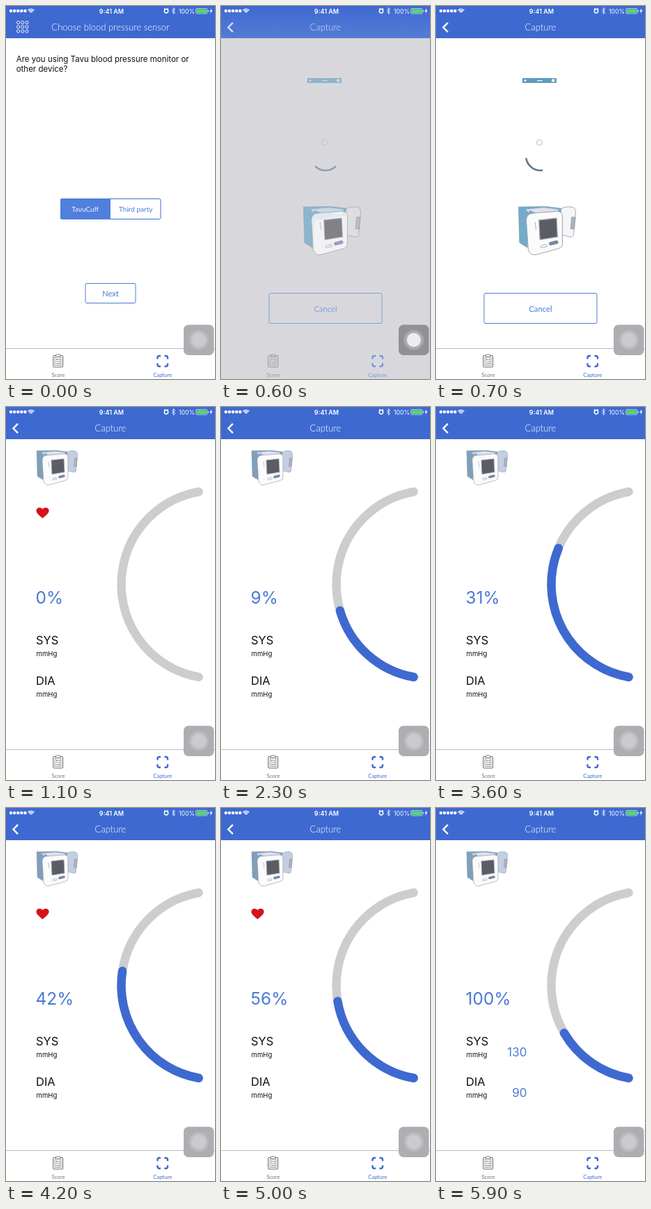
Recreate the animation shown at these times as an HTML page with a canvas. Size 300x533 px, loop 6 s.

```html
<!DOCTYPE html>
<html lang="en">
<head>
<meta charset="utf-8">
<title>Blood pressure capture</title>
<style>
html, body { margin: 0; width: 100%; height: 100%; overflow: hidden; background: #fff; }
canvas { display: block; width: 300px; height: 533px; }
</style>
</head>
<body>
<canvas id="stage"></canvas>
<script>
const LOOP = 6000;
const BLUE = '#3e69d1', TEXT_BLUE = '#4b7ad6', GREY = '#cccdcf';
const SANS = 'Inter, sans-serif', ROUND = 'Lato, sans-serif';
const canvas = document.getElementById('stage');
const ctx = canvas.getContext('2d');
const ratio = window.devicePixelRatio || 1;
canvas.width = 300 * ratio;
canvas.height = 533 * ratio;

function paint(fill, stroke, width = 1) {
  if (fill) { ctx.fillStyle = fill; ctx.fill(); }
  if (stroke) { ctx.strokeStyle = stroke; ctx.lineWidth = width; ctx.stroke(); }
}
function box(x, y, w, h, r, fill, stroke, width) {
  ctx.beginPath();
  ctx.roundRect(x, y, w, h, r);
  paint(fill, stroke, width);
}
function disc(x, y, r, fill, stroke, width) {
  arc(x, y, r, 0, 360, fill, stroke, width);
}
function arc(x, y, r, from, to, fill, stroke, width) {
  ctx.beginPath();
  ctx.arc(x, y, r, from * Math.PI / 180, to * Math.PI / 180);
  paint(fill, stroke, width);
}
function shape(path, fill, stroke, width) {
  const p = new Path2D(path);
  if (fill) { ctx.fillStyle = fill; ctx.fill(p); }
  if (stroke) { ctx.strokeStyle = stroke; ctx.lineWidth = width || 1; ctx.stroke(p); }
}
function text(str, x, y, font, color, align = 'left') {
  ctx.font = font;
  ctx.fillStyle = color;
  ctx.textAlign = align;
  ctx.fillText(str, x, y);
}
function faded(alpha, drawPart) {
  ctx.save();
  ctx.globalAlpha = alpha;
  drawPart();
  ctx.restore();
}

function statusBar() {
  for (let i = 0; i < 5; i++) disc(7 + i * 5.1, 7, 2.2, '#fff');
  for (const r of [2, 4, 6]) arc(36, 10.3, r, 222, 318, null, '#fff', 1.3);
  text('9:41 AM', 151.5, 10.5, '600 9px ' + SANS, '#fff', 'center');
  disc(230, 7.3, 2.7, null, '#fff', 1.5);
  shape('M227 4.5l1.6-1.3M233 4.5l-1.6-1.3', null, '#fff', 1.2);
  shape('M238.2 4.7l4.6 4.4-2.4 2.4v-9l2.4 2.3-4.6 4.4', null, '#fff', 0.8);
  text('100%', 248, 10.5, '8.7px ' + SANS, '#fff');
  box(272.5, 3.5, 16.5, 7.5, 1.5, null, '#dfe8fa', 0.7);
  box(273.5, 4.5, 14.5, 5.5, 0.8, '#52da67');
  box(289.7, 5.7, 1, 3, 0.5, '#dfe8fa');
  shape('M295.2 3l-3 4.8h2l-.9 3.4 3.2-4.9h-2z', '#fff');
}

function header(title, { root = false, dim = false } = {}) {
  let fill = BLUE;
  if (dim) {
    fill = ctx.createLinearGradient(0, 0, 0, 46);
    fill.addColorStop(0, '#3f69d2');
    fill.addColorStop(1, '#547cd6');
  }
  box(0, 0, 300, 46, 0, fill);
  statusBar();
  faded(dim ? 0.75 : 1, () => {
    text(title, 150, 35, '300 13px ' + ROUND, '#fff', 'center');
    if (root) {
      for (let i = 0; i < 9; i++) disc(17.6 + i % 3 * 6.2, 23.6 + Math.floor(i / 3) * 6.2, 2.1, null, '#fff', 0.9);
    } else {
      shape('M17 23.8L10.5 30.5L17 37.2', null, '#fff', 2.5);
    }
  });
}

function tabBar(paper = '#fff') {
  const ink = '#717176';
  box(67.8, 499.5, 13.8, 16.5, 1.2, null, ink, 1.1);
  box(70.3, 501.8, 8.8, 11.8, 0, null, ink, 0.7);
  box(71.5, 498, 6.4, 3.3, 1, paper, ink, 0.9);
  shape('M72 505h2M75 505h3M72 508h2M75 508h3M72 511h6M73 504v2', null, ink, 1.1);
  text('Score', 75, 530.3, '7.8px ' + ROUND, ink, 'center');
  shape('M217.5 504.5v-2q0-2.5 2.5-2.5h2M227.5 500h2q2.5 0 2.5 2.5v2' +
    'M232 510.5v2q0 2.5-2.5 2.5h-2M222 515h-2q-2.5 0-2.5-2.5v-2', null, BLUE, 2.4);
  text('Capture', 224.8, 530.3, '7.8px ' + ROUND, BLUE, 'center');
}

function tabLine() {
  box(0, 489, 300, 1, 0, '#bcbcbe');
}

function touchButton(pressed) {
  box(255, 455.5, 43.5, 43.5, 7, pressed ? '#919195' : '#aeaeb2');
  disc(276.8, 477.2, 14.5, pressed ? '#a6a6aa' : '#b7b7bb');
  disc(276.8, 477.2, 12.2, pressed ? '#aeaeb2' : '#c0c0c4');
  disc(276.8, 477.2, 10, pressed ? '#ededef' : '#cbcbcf');
}

function monitor(x, y, scale, strap, cuff) {
  ctx.save();
  ctx.translate(x, y);
  ctx.scale(scale, scale);
  ctx.lineJoin = 'round';
  shape('M43 4Q51 0 57 2Q60 3 59.5 9L57.5 30Q57 33 53 32L45 30z', strap, '#989ca6', 0.6);
  shape('M55.5 12h3.8l-1.2 12h-3.6z', '#aeb3c0', '#858a96', 0.5);
  shape('M1 1.5L29 1L45 3L44 10L12 15L10 43L2 38z', cuff, '#8a96a4', 0.4);
  shape('M8 4L27 2L42 4L41 9L14 10z', '#dce3ed', '#9aa2ae', 0.4);
  shape('M12 6Q19 11 31 8', null, '#7da0d8', 3);
  shape('M15 8L40 6Q46 6 46 11L46 39Q46 43 42 44L20 50Q13 52 11 45L9 15Q9 9 15 8z', '#fbfbfc', '#9da1ab', 0.7);
  shape('M22 15L40 13L41 32L23 35z', '#5b5c64', '#a0a3ac', 0.9);
  shape('M18 17L19 25', null, '#b0b4bf', 0.8);
  ctx.lineCap = 'round';
  shape('M25 42L29 41', null, '#9fa5b2', 3);
  shape('M25 42L29 41', null, '#fff', 1.8);
  shape('M34 39L40 37.5', null, '#7986a6', 3.6);
  ctx.restore();
}

function chooserScreen() {
  header('Choose blood pressure sensor', { root: true });
  const copy = '11.5px ' + SANS;
  text('Are you using Tavu blood pressure monitor or', 14.7, 79.5, copy, '#111');
  text('other device?', 14.7, 94, copy, '#111');
  box(78.5, 275.5, 143.5, 29, 2.5, '#fff', BLUE);
  box(78, 275, 72, 30, [2.5, 0, 0, 2.5], '#507fdd');
  const label = '10px ' + ROUND;
  text('TavuCuff', 113.7, 293.5, label, '#f2f6ff', 'center');
  text('Third party', 186.2, 293.5, label, TEXT_BLUE, 'center');
  box(114, 396.5, 72, 28, 2, null, TEXT_BLUE);
  text('Next', 150, 414.5, '11px ' + ROUND, TEXT_BLUE, 'center');
  tabLine();
  tabBar();
}

function searchScreen(dim, t) {
  const paper = dim ? '#d8d8dc' : '#fff';
  box(0, 0, 300, 533, 0, paper);
  header('Capture', { dim });
  if (!dim) tabLine();
  faded(dim ? 0.6 : 1, () => {
    box(124, 103, 49, 7, 0.5, '#5d9cbe');
    disc(128, 106.5, 1.5, '#eef6fa');
    box(145, 106, 8, 1.2, 0.5, '#eef6fa');
    box(166, 104.5, 4.5, 4, 1, '#eef6fa');
    disc(148.5, 195, 4, null, '#b2b4ba', 0.9);
    const turn = (t - 600) * 0.36;
    arc(150, 214, 21, 45 + turn, 135 + turn, null, '#5f7694', 2.6);
    box(69, 410.5, 162, 43, 2, null, TEXT_BLUE);
    text('Cancel', 150, 436.5, '11.3px ' + ROUND, TEXT_BLUE, 'center');
    tabBar(paper);
  });
  faded(dim ? 0.75 : 1, () => monitor(117, 285, 1.4, dim ? '#dfe0e4' : '#f6f6f8', '#73abca'));
}

// The cuff inflates quickly, then deflates slowly.
function pressure(t) {
  const s = t / 1000;
  const inflating = 0.35 * (s - 1.16);
  const deflating = 0.555 - 0.144 * (s - 4.2);
  return Math.max(0, Math.min(inflating, deflating));
}

function gauge(level) {
  ctx.lineCap = 'round';
  arc(300, 253.5, 134.5, 100, 260, null, GREY, 12.4);
  if (level > 0) arc(300, 253.5, 134.5, 100, 100 + 160 * level, null, BLUE, 12.4);
  ctx.lineCap = 'butt';
}

function readingScreen(t) {
  const done = t >= 5700;
  const percent = done ? 100 : Math.max(0, Math.floor((t - 1780) * 0.01745));
  const beat = (t + 300) % 1000 < 550;
  header('Capture');
  monitor(43, 61, 1, '#c3cee3', '#7f9fba');
  if (beat && !done) {
    shape('M52.5 159C48 155 43.5 152 43.5 148C43.5 143.5 49.5 142 52.5 146' +
      'C55.5 142 61.7 143.5 61.7 148C61.7 152 57 155 52.5 159z', '#d5131b');
  }
  gauge(pressure(t));
  text(percent + '%', 42.5, 281, '24.5px ' + SANS, TEXT_BLUE);
  [['SYS', 339, '130'], ['DIA', 397, '90']].forEach(([name, y, value]) => {
    text(name, 43, y, '16.5px ' + SANS, '#111');
    text('mmHg', 43.5, y + 17, '9.6px ' + SANS, '#111');
    if (done) text(value, 130.5, y + 16, '17px ' + SANS, TEXT_BLUE, 'right');
  });
  tabLine();
  tabBar();
}

function draw(now) {
  const t = now % LOOP;
  const dim = t >= 400 && t < 700;
  ctx.setTransform(ratio, 0, 0, ratio, 0, 0);
  box(0, 0, 300, 533, 0, '#fff');
  if (t < 300) chooserScreen();
  else if (t < 900) searchScreen(dim, t);
  else readingScreen(t);
  touchButton(dim);
}

let start;
function tick(now) {
  start ??= now;
  draw(now - start);
  requestAnimationFrame(tick);
}
draw(0);
requestAnimationFrame(tick);
</script>
</body>
</html>
```
